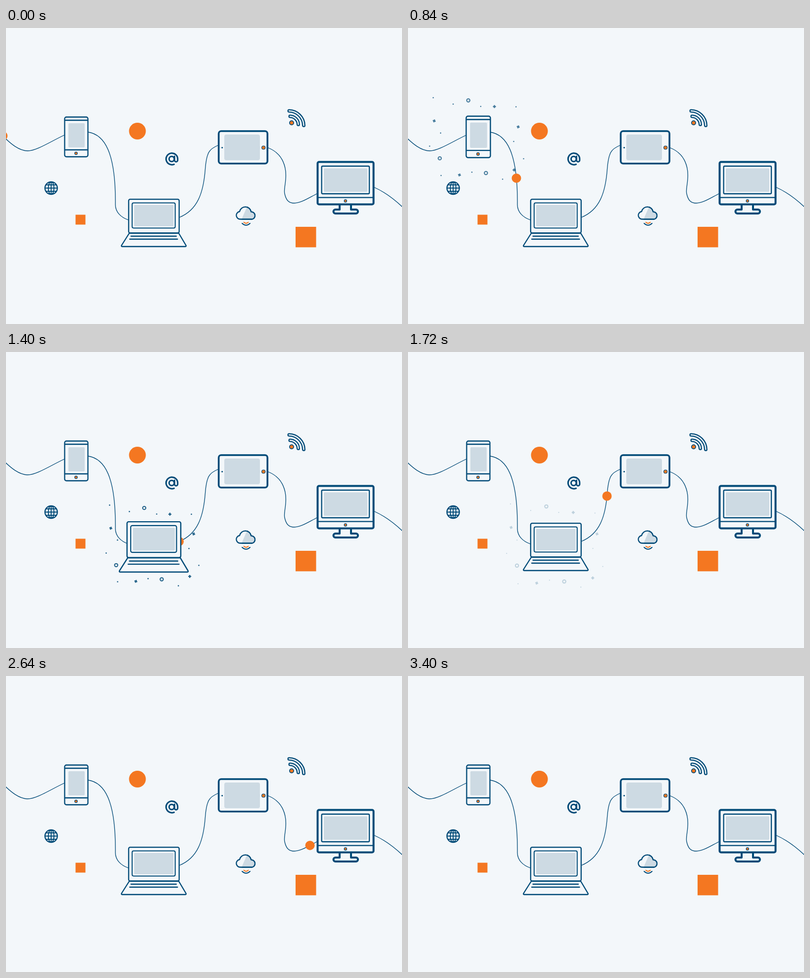
These frames come from a looping animation (800 px wide and 600 px high, 3.48 s). An HTML page:

```html
<!DOCTYPE html>
<html lang="en">
<head>
<meta charset="utf-8">
<title>Connected devices</title>
<style>
  html, body { margin: 0; width: 100%; height: 100%; overflow: hidden; background: #f3f7fa; }
  svg { display: block; width: 100%; height: 100%; }
  .line { fill: none; stroke: #004a77; stroke-width: 1.3; }
  .ink { fill: none; stroke: #004a77; stroke-width: 2.3; stroke-linecap: round; stroke-linejoin: round; }
  .body { fill: #f3f7fa; }
  .glass { fill: #cddae3; stroke: none; }
  .key { fill: #f47721; stroke-width: 1.2; }
  .orange { fill: #f47721; }
  .bold { stroke-width: 3; }
</style>
</head>
<body>
<svg viewBox="0 0 800 600">
  <path id="wire" class="line" d="M-10 215C10 236 27 249 44 249C62 249 92 229 118 217L166 211
    C198 216 222 250 221 358C221 374 233 384 247 389L350 384C387 369 399 334 402.500 286
    C405 252 411 245 428 238L530 243C560 255 567 283 565 306C564 322 561 328 563 336
    C566 350 572 355 582 355C596 355 612 344 628 336L744 323C764 332 782 345 800 362L880 440"/>
  <g id="bursts"></g>
  <circle id="ball" class="orange" r="9.500"/>

  <g class="ink device">
    <rect class="body" x="118.500" y="180.500" width="47" height="80.500" rx="3.500"/>
    <path d="M119 187H165M119 247H165"/>
    <rect class="glass" x="126" y="193" width="33" height="49" rx="2"/>
    <circle class="key" cx="141.500" cy="254" r="2.700"/>
  </g>

  <g class="ink device">
    <path class="body" d="M249 416H349L363.500 440.500Q364.500 443 362 443H235Q232.500 443 233.500 440.500Z"/>
    <rect class="body" x="247.800" y="347.200" width="102" height="68.300" rx="3"/>
    <rect x="254.800" y="354.500" width="87" height="51" rx="3" stroke-width="2"/>
    <rect class="glass" x="259" y="358.500" width="79.500" height="43.500" rx="2"/>
    <path d="M252.500 422H344M250 428H346.500"/>
  </g>

  <g class="ink device">
    <rect class="body" x="429.700" y="209" width="98.500" height="65.700" rx="5" style="stroke-width:3.600"/>
    <rect class="glass" x="441" y="216" width="72" height="52" rx="4"/>
    <circle class="key" cx="520.200" cy="242.500" r="3.500"/>
    <circle cx="436.700" cy="242.500" r="1.500" fill="#004a77" stroke="none"/>
  </g>

  <g class="ink device">
    <path class="body" d="M674 358V368H665.500a4 4 0 0 0 0 8H707a4 4 0 0 0 0-8H697V358" style="stroke-width:4"/>
    <rect class="body" x="629.500" y="271.500" width="113" height="86" rx="3" style="stroke-width:4"/>
    <rect x="637.700" y="280" width="96.300" height="56" rx="2"/>
    <rect class="glass" x="642" y="284.500" width="88" height="47.500" rx="2"/>
    <path d="M630 343.700H742"/>
    <circle class="key" cx="685.800" cy="350.500" r="2.600"/>
  </g>

  <!-- plain marks -->
  <circle class="orange" cx="265.500" cy="209" r="17"/>
  <rect class="orange" x="140.500" y="378.500" width="20" height="20"/>
  <rect class="orange" x="585" y="403" width="41.500" height="41.500"/>

  <g class="ink">
    <circle cx="91.200" cy="324.500" r="12.500"/>
    <ellipse cx="91.200" cy="324.500" rx="5.800" ry="12.500" style="stroke-width:2"/>
    <path d="M91.200 312V337M79 324.500H103.500M81.500 318H101M81.500 331H101" style="stroke-width:2"/>
  </g>

  <g class="ink bold">
    <circle cx="334.700" cy="265.500" r="5.200"/>
    <path d="M339.500 276.300A11.700 11.700 0 1 1 346.800 265.500V268a3.200 3.200 0 0 1-6.400 0V260"/>
  </g>

  <g id="feed" class="ink">
    <g id="arcs">
      <path d="M574 179A17 17 0 0 1 590.500 195.500M572 168A30 30 0 0 1 601.500 197.500" style="stroke-width:7"/>
      <path d="M574 179A17 17 0 0 1 590.500 195.500M572 168A30 30 0 0 1 601.500 197.500"
        style="stroke:#f3f7fa;stroke-width:2.400"/>
    </g>
    <circle class="key" cx="577" cy="192.300" r="4.100" style="stroke-width:1.700"/>
  </g>

  <g class="ink">
    <clipPath id="cloudClip"><path d="M488 360H510V392H474Z"/></clipPath>
    <path id="cloud" d="M472.500 387.500A7.800 7.800 0 0 1 472 372A11.800 11.800 0 0 1 495.200 372.600A7.600 7.600 0 0 1 497.500 387.500Z"/>
    <use href="#cloud" fill="#cddae3" clip-path="url(#cloudClip)"/>
    <path d="M477 396Q485 403.500 493 396" style="stroke-width:2"/>
    <path d="M480.500 393.800Q485 398 489.500 393.800" style="stroke:#f47721;stroke-width:2"/>
  </g>
</svg>

<script>
const LOOP = 3480, STEP = 40;
const NS = 'http://www.w3.org/2000/svg';
const wire = document.getElementById('wire');
const ball = document.getElementById('ball');
const bursts = document.getElementById('bursts');
const shapes = [...document.querySelectorAll('.device')];

// Start time, pulse centre, and burst offset from the phone
const devices = [
  { start: 450, cx: 142, cy: 221, dx: 0, dy: 0 },
  { start: 1080, cx: 299, cy: 395, dx: 157.5, dy: 168.3 },
  { start: 1860, cx: 479, cy: 242, dx: 341.5, dy: 18.2 },
  { start: 2640, cx: 686, cy: 324, dx: 543, dy: 105.5 }
];

// Each bit: near x, y, then resting x, y
const kinds = 'ddod+dxdxdddodxdod+';
const bits = [
  [57, 148, 49, 139], [95, 160, 90, 152.5], [121.3, 155, 122, 144], [146.7, 168, 147, 156],
  [167.3, 169, 177, 156], [209.7, 166.5, 221, 157.5], [62, 192.3, 50, 187], [79.3, 212.5, 61.5, 213],
  [215.3, 200.3, 225, 200.5], [203, 230, 217, 230], [223, 259, 237, 267], [52, 238, 41, 240],
  [70.7, 261.5, 62, 265], [75.3, 288, 64, 302.5], [110, 288.3, 102, 301], [132.3, 284, 128, 295],
  [154.5, 282, 158.4, 298], [188.4, 299.3, 192, 309], [209, 279.3, 216.2, 290.5]
];

function make(tag, attrs, parent) {
  const el = document.createElementNS(NS, tag);
  for (const k in attrs) el.setAttribute(k, attrs[k]);
  return parent.appendChild(el);
}

function makeBit(kind, parent) {
  if (kind === 'd') return make('circle', { r: 1.4, fill: '#004a77' }, parent);
  if (kind === 'o') return make('circle', { r: 3.2, fill: 'none', stroke: '#004a77', 'stroke-width': 2 }, parent);
  return make('path', { d: 'M-3 0H3M0-3V3', stroke: '#004a77', 'stroke-width': 2.4 }, parent);
}

for (const d of devices) {
  d.group = make('g', {}, bursts);
  d.bits = [...kinds].map(k => makeBit(k, d.group));
}

// The ball passes these x positions at these times
const total = wire.getTotalLength();
const stops = [[0, -6.5], [560, 179], [1080, 238], [1720, 402], [2240, 552.5], [3000, 741]].map(([t, x]) => {
  let s = 0;
  while (s < total && wire.getPointAtLength(s).x < x) s += 0.25;
  return [t, s];
});

function distance(t) {
  let i = 0;
  while (i < stops.length - 2 && t > stops[i + 1][0]) i++;
  const [t0, s0] = stops[i], [t1, s1] = stops[i + 1];
  return s0 + (s1 - s0) * (t - t0) / (t1 - t0);
}

const clamp = x => Math.max(0, Math.min(1, x));
const smooth = x => x * x * (3 - 2 * x);

function pulse(e) {
  if (e <= 0) return 1;
  return 1 + 0.1 * (e < 130 ? e / 130 : 1 - smooth(clamp((e - 130) / 470)));
}

function drawBurst(d, e) {
  const alpha = clamp((750 - e) / 500);
  const shown = e > 0 && alpha > 0;
  d.group.setAttribute('visibility', shown ? 'visible' : 'hidden');
  if (!shown) return;
  d.group.setAttribute('opacity', alpha);
  const out = 1 - (1 - clamp(e / 110)) ** 2;
  const drift = e > 110 ? 1 - Math.exp((110 - e) / 200) : 0;
  bits.forEach(([x0, y0, x1, y1], i) => {
    const x = 142 + (x0 - 142) * out + (x1 - x0) * drift + d.dx;
    const y = 221 + (y0 - 221) * out + (y1 - y0) * drift + d.dy;
    const size = kinds[i] === 'd' ? 0.65 + 0.35 * alpha : 1;
    const turn = kinds[i] === 'x' ? 20 : 0;
    d.bits[i].setAttribute('transform', `translate(${x} ${y}) rotate(${turn}) scale(${size})`);
  });
}

function draw(t) {
  const p = wire.getPointAtLength(Math.min(total, distance(t)));
  ball.setAttribute('cx', p.x);
  ball.setAttribute('cy', p.y);
  devices.forEach((d, i) => {
    const e = t - d.start, k = pulse(e);
    shapes[i].setAttribute('transform', `translate(${d.cx} ${d.cy}) scale(${k}) translate(${-d.cx} ${-d.cy})`);
    drawBurst(d, e);
  });
}

const begin = performance.now();
function tick() {
  const t = (performance.now() - begin) % LOOP;
  draw(Math.min(3400, Math.floor(t / STEP) * STEP));
  requestAnimationFrame(tick);
}
tick();
</script>
</body>
</html>
```
